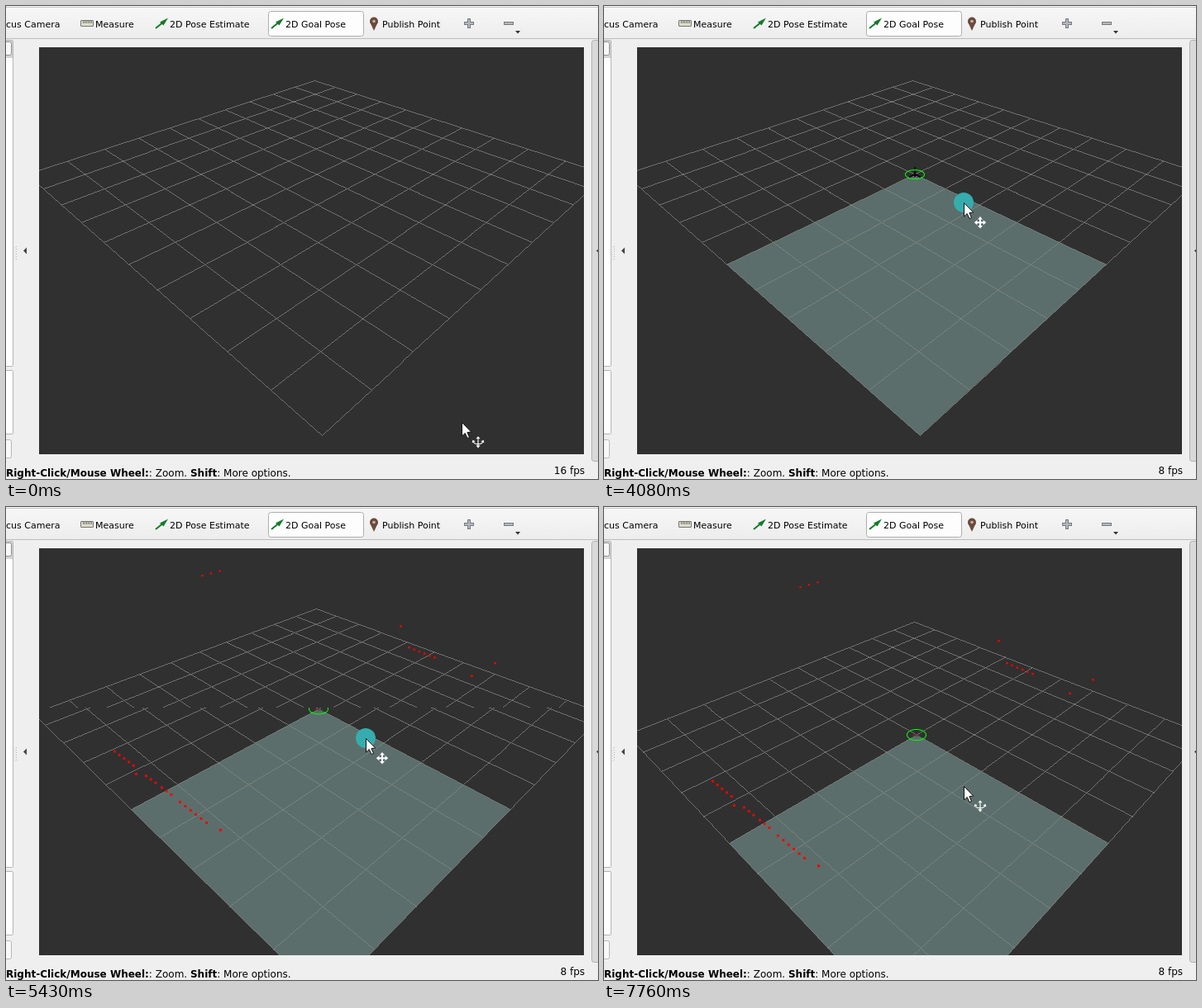
An HTML page with a canvas for the animation above (8 s loop, 716 by 573 pixels).

```html
<!DOCTYPE html>
<html lang="en">
<head>
<meta charset="utf-8">
<title>3D goal view</title>
<style>
html, body { margin: 0; width: 100%; height: 100%; overflow: hidden; background: #efefef; }
canvas { display: block; }
</style>
</head>
<body>
<canvas id="stage" width="716" height="573"></canvas>
<script>
const ctx = document.getElementById('stage').getContext('2d');
const LOOP = 8000;
const FONT = '"DejaVu Sans", sans-serif';
const VIEW = { left: 40, top: 50, right: 699, bottom: 543 };
const SHOW = { axes: 1100, ring: 1480, map: 2600, scan: 4200 };
const DRAG = { start: 4080, move: 4350, end: 6100, distance: 72 };
const REPAINT = { period: 138, phase: 5, lag: 130 };

// Pointer strokes: start and end time, distance in x and y
const STROKES = [
  [30, 210, 11, -112], [410, 840, -37, -86], [1040, 1240, -16, 1],
  [1400, 1580, -7, -8], [1970, 2380, -111, -67], [3220, 3750, 44, 6],
  [6150, 6390, 0, -4], [6550, 6630, 0, -11], [7250, 7760, 0, 52]
];

function ease(t, from, to) {
  const u = Math.min(1, Math.max(0, (t - from) / (to - from)));
  return u * u * (3 - 2 * u);
}
const dragging = t => t >= DRAG.start && t < DRAG.end;
const panAt = t => ({
  x: 2 * ease(t, DRAG.start, DRAG.start + 400),
  y: DRAG.distance * ease(t, DRAG.move, DRAG.end)
});

function cursorAt(t) {
  let x = 551, y = 504 + 0.87 * panAt(t).y;
  for (const [from, to, dx, dy] of STROKES) {
    const e = ease(t, from, to);
    x += dx * e;
    y += dy * e;
  }
  return [Math.round(x), Math.round(y)];
}

// Ground plane to screen; panning keeps the depth of every point
function project(a, b, pan) {
  const s = a + b, d = a - b, w = 1 - 0.04721 * s;
  return [(375.5 - 17.4 * s + 35.05 * d + pan.x) / w + 0.5,
          (203.5 + 7.1 * s + pan.y) / w + 0.5];
}

function path(points, close) {
  ctx.beginPath();
  points.forEach(p => ctx.lineTo(p[0], p[1]));
  if (close) ctx.closePath();
}
function fill(points, color) { path(points, true); ctx.fillStyle = color; ctx.fill(); }
function stroke(points, color, width = 1, close = false) {
  path(points, close);
  ctx.strokeStyle = color;
  ctx.lineWidth = width;
  ctx.stroke();
}
function rect(x, y, w, h, color) { ctx.fillStyle = color; ctx.fillRect(x, y, w, h); }
function panel(x, y, w, h, r, face, edge) {
  ctx.beginPath();
  ctx.roundRect(x + 0.5, y + 0.5, w, h, r);
  ctx.fillStyle = face;
  ctx.fill();
  ctx.strokeStyle = edge;
  ctx.lineWidth = 1;
  ctx.stroke();
}
function disc(x, y, r, color) {
  ctx.beginPath();
  ctx.arc(x, y, r, 0, 7);
  ctx.fillStyle = color;
  ctx.fill();
}
function text(str, x, y, size, weight = '') {
  ctx.font = `${weight} ${size}px ${FONT}`;
  ctx.fillStyle = '#000';
  ctx.fillText(str, x, y);
  return x + ctx.measureText(str).width;
}

// Hard-edged one pixel line, added to the current path
function pixelLine([x0, y0], [x1, y1]) {
  const n = Math.ceil(Math.max(Math.abs(x1 - x0), Math.abs(y1 - y0)));
  for (let i = 0; i <= n; i++) {
    const x = Math.floor(x0 + (x1 - x0) * i / n), y = Math.floor(y0 + (y1 - y0) * i / n);
    if (x >= VIEW.left && x < VIEW.right && y < VIEW.bottom) ctx.rect(x, y, 1, 1);
  }
}

function drawGrid(pan, color) {
  ctx.beginPath();
  for (let i = -5; i <= 5; i++) {
    pixelLine(project(i, -5, pan), project(i, 5, pan));
    pixelLine(project(-5, i, pan), project(5, i, pan));
  }
  ctx.fillStyle = color;
  ctx.fill();
}

function drawMap(pan) {
  const corners = [[0, 0], [5, 0], [5, 5], [0, 5]].map(p => project(...p, pan));
  fill(corners, '#5c6e6b');
  ctx.save();
  path(corners, true);
  ctx.clip();
  drawGrid(pan, '#75837f');
  ctx.restore();
}

function drawRobot(t, pan) {
  const [x, y] = project(0, 0, pan), scanned = t >= SHOW.scan;
  if (t >= SHOW.axes) {
    const dark = scanned ? 'rgba(10,40,10,.5)' : '#000';
    stroke([[x, y - 9], [x, y + 3]], dark, scanned ? 1 : 1.6);
    stroke([[x - 7, y + 3.5], [x, y], [x + 7, y + 3.5]], dark, scanned ? 1 : 1.6);
  }
  if (scanned) stroke([[x - 5, y + 1], [x + 1, y - 1]], 'rgba(190,30,20,.7)');
  if (t >= SHOW.ring) {
    const ring = [];
    for (let q = 0; q < 6.28; q += Math.PI / 16) {
      ring.push(project(0.233 * Math.cos(q), 0.233 * Math.sin(q), pan));
    }
    stroke(ring, '#0f0', 1.05, true);
  }
}

// Laser hits: straight rows of dots, lifted with the pan by their depth
function drawScan(pan) {
  const row = (count, x, y, dx = 5.7, dy = 3.9) => {
    for (; count > 0; count--, x += dx, y += dy) {
      const near = (y + 156) / 360, size = 1.5 + 1.1 * near;
      rect(x + 0.5 - size / 2 + (pan.x - 2) * near,
           y + 0.5 - size / 2 + (pan.y - 7) * near, size, size, '#f00');
    }
  };
  row(5, 131, 257);
  row(3, 169, 284);
  row(3, 188, 297);
  row(6, 210, 313, 6.4, 4.6);
  row(2, 157, 282, 102, 62);
  row(3, 237, 58, 10.5, -2.5);
  row(6, 487, 136, 6.2, 2.2);
  row(1, 477, 113);
  row(2, 563, 167, 28, -14);
}

function drawScene(t, pan, top, bottom) {
  ctx.save();
  ctx.beginPath();
  ctx.rect(VIEW.left, top, VIEW.right - VIEW.left, bottom - top);
  ctx.clip();
  rect(VIEW.left, top, VIEW.right - VIEW.left, bottom - top, '#303030');
  drawGrid(pan, '#707071');
  if (t >= SHOW.map) drawMap(pan);
  drawRobot(t, pan);
  if (t >= SHOW.scan) drawScan(pan);
  if (dragging(t)) disc(...cursorAt(t), 12, '#36acae');
  ctx.restore();
}

// Repaints sweep down the view; rows below still show the earlier pan
function drawView(t) {
  const swept = (t + REPAINT.phase) % REPAINT.period / REPAINT.period;
  const tear = dragging(t)
    ? Math.round(VIEW.top + swept * (VIEW.bottom - VIEW.top)) : VIEW.bottom;
  drawScene(t, panAt(t), VIEW.top, tear);
  if (tear < VIEW.bottom) drawScene(t, panAt(t - REPAINT.lag), tear, VIEW.bottom);
}

function arrowHead(x, y, angle, size = 3) {
  ctx.save();
  ctx.translate(x, y);
  ctx.rotate(angle);
  fill([[size, 0], [-0.5, -size], [-0.5, size]], '#fff');
  ctx.restore();
}

function drawMoveIcon() {
  for (let i = 0; i < 4; i++) {
    const q = i * Math.PI / 2, x = 4.2 * Math.cos(q), y = 4.2 * Math.sin(q);
    stroke([[0, 0], [x, y]], '#fff', 2);
    arrowHead(x, y, q);
  }
}

function drawRotateIcon() {
  stroke([[0, -4], [0, 5]], '#fff', 1.2);
  ctx.beginPath();
  ctx.ellipse(0, -1, 6, 3.4, 0, 0, Math.PI);
  ctx.stroke();
  for (const side of [-1, 1]) {
    arrowHead(0, 4.5 * side, side * Math.PI / 2, 2.6);
    arrowHead(5.5 * side, -0.5, -Math.PI / 2 + side * 0.5, 2.3);
  }
}

function drawCursor(t) {
  const [x, y] = cursorAt(t);
  const arrow = [[0, 0], [0, 16.5], [3.7, 13], [6.5, 19], [9, 18], [6.4, 12], [11.2, 11.6]];
  ctx.save();
  ctx.translate(x + 0.5, y + 0.5);
  ctx.lineJoin = 'round';
  fill(arrow, '#fff');
  stroke(arrow, '#111', 1, true);
  ctx.translate(19.5, 23.8);
  if (dragging(t)) drawMoveIcon(); else drawRotateIcon();
  ctx.restore();
}

function greenArrow(x) {
  stroke([[x, 27], [x + 8, 20.5]], '#167a2c', 2);
  fill([[x + 15, 14.5], [x + 9.5, 23.5], [x + 5, 19.5]], '#167a2c');
}

function bar(x, y, w, h) {
  rect(x, y, w, h, '#777b82');
  rect(x + 1, y + 1, w - 2, h - 2, '#b4b8bf');
}

function drawToolbar() {
  const shade = ctx.createLinearGradient(0, 0, 0, 39);
  shade.addColorStop(0, '#f7f7f7');
  shade.addColorStop(1, '#ededed');
  rect(0, 0, 716, 39, shade);
  rect(0, 1, 716, 1, '#c6c6c6');
  rect(0, 39, 716, 1, '#bdbdbd');
  panel(317, 6, 115, 30, 3, '#fdfdfd', '#aeaeae');

  panel(90, 17, 15, 7, 0.5, '#dcdccf', '#77776d');
  for (let x = 93; x < 105; x += 2) rect(x, 18, 1, 3, '#77776d');
  greenArrow(181);
  greenArrow(321);
  disc(445, 18.5, 5, '#6b4a3c');
  fill([[440.4, 20], [449.6, 20], [445, 30]], '#6b4a3c');
  disc(445, 18.5, 1.8, '#c5b4ab');
  bar(554, 19, 12, 4);
  bar(558, 15, 4, 12);
  rect(555, 20, 10, 2, '#b4b8bf');
  bar(602, 19, 12, 4);
  fill([[616, 30], [622, 30], [619, 33.5]], '#333');

  text('cus Camera', 0, 26, 11);
  text('Measure', 108, 26, 11);
  text('2D Pose Estimate', 198, 26, 11);
  text('2D Goal Pose', 338, 26, 11);
  text('Publish Point', 455, 26, 11);
}

function drawFrame() {
  rect(0, 0, 716, 573, '#efefef');
  drawToolbar();
  panel(-6, 41, 14, 395, 1, '#fff', '#b4b4b4');
  rect(0, 42, 8, 21, '#d4d4d4');
  panel(-6, 43, 12, 16, 2, '#f8f8f8', '#909090');
  panel(-6, 441, 14, 77, 1, '#fff', '#b4b4b4');
  panel(-6, 525, 12, 22, 2, '#f8f8f8', '#b8b8b8');
  panel(708, 41, 20, 510, 3, '#d9d9d9', '#b0b0b0');
  for (let y = 291; y < 307; y += 3) {
    rect(12, y, 1, 1, '#b5b5b5');
    rect(10, y + 1, 1, 1, '#d2d2d2');
  }
  for (const x of [21, 714]) fill([[x + 4, 292.5], [x + 4, 300.5], [x, 296.5]], '#444');
}

function drawStatus(t) {
  let x = text('Right-Click/Mouse Wheel:', 0, 570, 12, 'bold');
  x = text(': Zoom. ', x, 570, 12);
  x = text('Shift', x, 570, 12, 'bold');
  text(': More options.', x, 570, 12);
  const fps = t < 740 ? 16 : t < 1970 ? 12 : t < 3220 ? 10 : 8;
  ctx.textAlign = 'right';
  text(fps + ' fps', 700, 567, 12);
  ctx.textAlign = 'left';
}

const start = performance.now();
function tick() {
  const t = (performance.now() - start) % LOOP;
  drawFrame();
  drawView(t);
  drawStatus(t);
  drawCursor(t);
  requestAnimationFrame(tick);
}
tick();
</script>
</body>
</html>
```
